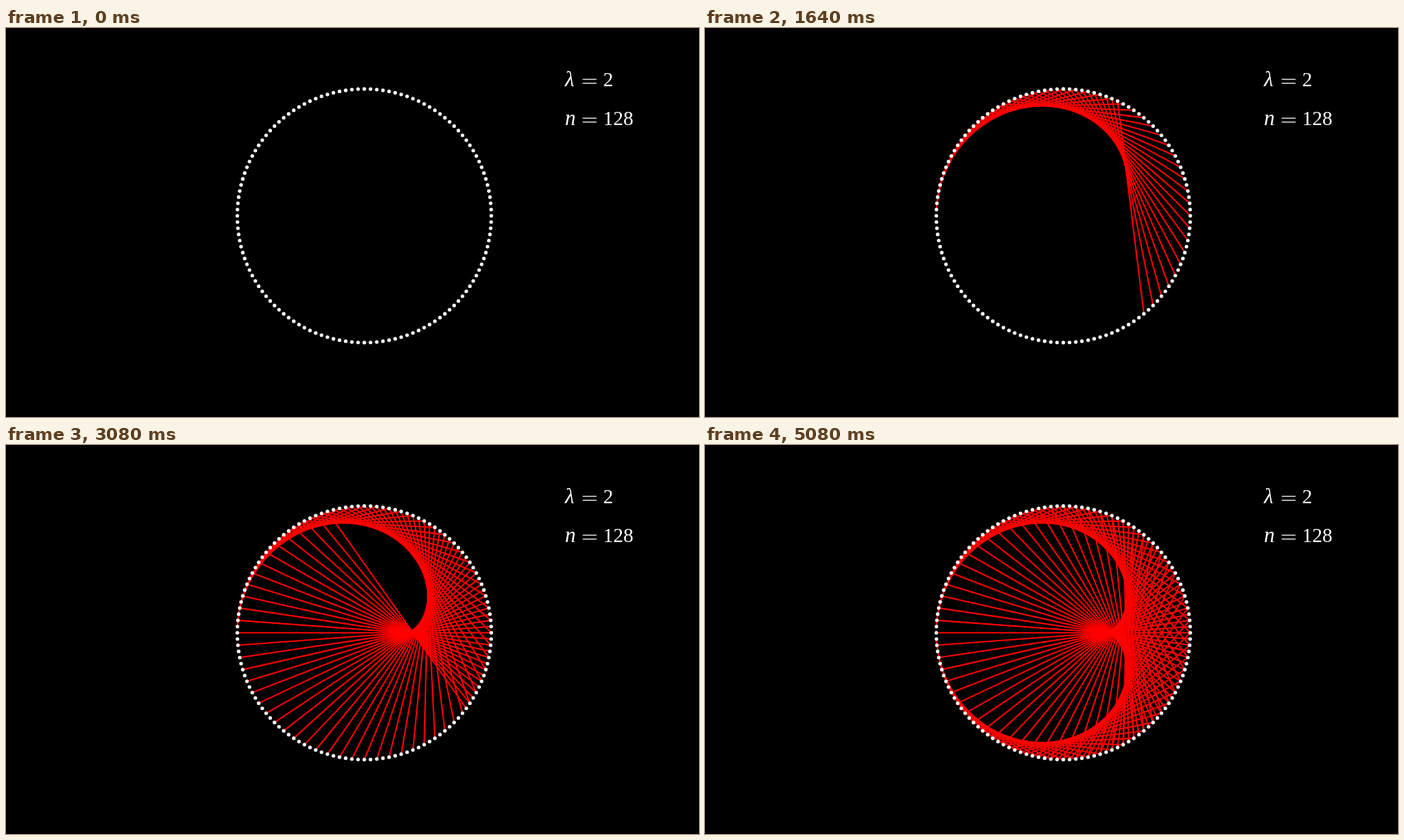
Animation, 998 px wide and 561 px high, one loop 7.08 s. Source, as an HTML page with a canvas:

```html
<!DOCTYPE html>
<html lang="en">
<head>
<meta charset="utf-8">
<title>Times table on a circle</title>
<style>
  html, body { margin: 0; width: 100%; height: 100%; overflow: hidden; background: #000; }
  canvas { display: block; }
</style>
</head>
<body>
<canvas id="stage" width="998" height="561"></canvas>
<script>
const ctx = document.getElementById('stage').getContext('2d');
const COUNT = 128, FACTOR = 2, STEP = 40, LOOP = 7080;
const CX = 516, CY = 270.8, RADIUS = 182.9;
const SERIF = '"Liberation Serif", serif';

// Points run clockwise from the leftmost one.
function point(i) {
  const angle = Math.PI + i * 2 * Math.PI / COUNT;
  return [CX + RADIUS * Math.cos(angle), CY + RADIUS * Math.sin(angle)];
}

function drawChord(i) {
  ctx.beginPath();
  ctx.moveTo(...point(i));
  ctx.lineTo(...point(i * FACTOR % COUNT));
  ctx.stroke();
}

function drawDot(i) {
  ctx.beginPath();
  ctx.arc(...point(i), 2.6, 0, 2 * Math.PI);
  ctx.fill();
}

function drawEquation(symbol, value, baseline) {
  ctx.font = `italic 31px ${SERIF}`;
  ctx.fillText(symbol, 805, baseline);
  ctx.fillRect(830.5, baseline - 10.6, 20, 1.3);
  ctx.fillRect(830.5, baseline - 5, 20, 1.3);
  ctx.font = `29px ${SERIF}`;
  ctx.fillText(value, 860, baseline);
}

function draw(time) {
  const chords = Math.min(COUNT - 1, Math.floor(time % LOOP / STEP));
  ctx.fillStyle = '#000';
  ctx.fillRect(0, 0, 998, 561);

  ctx.strokeStyle = '#f00';
  ctx.lineWidth = 2.1;
  for (let i = 1; i <= chords; i++) drawChord(i);

  ctx.fillStyle = '#fff';
  for (let i = 0; i < COUNT; i++) drawDot(i);
  drawEquation('λ', FACTOR, 84);
  drawEquation('n', COUNT, 140);
}

const start = performance.now();
function tick() {
  draw(performance.now() - start);
  requestAnimationFrame(tick);
}
tick();
</script>
</body>
</html>
```
